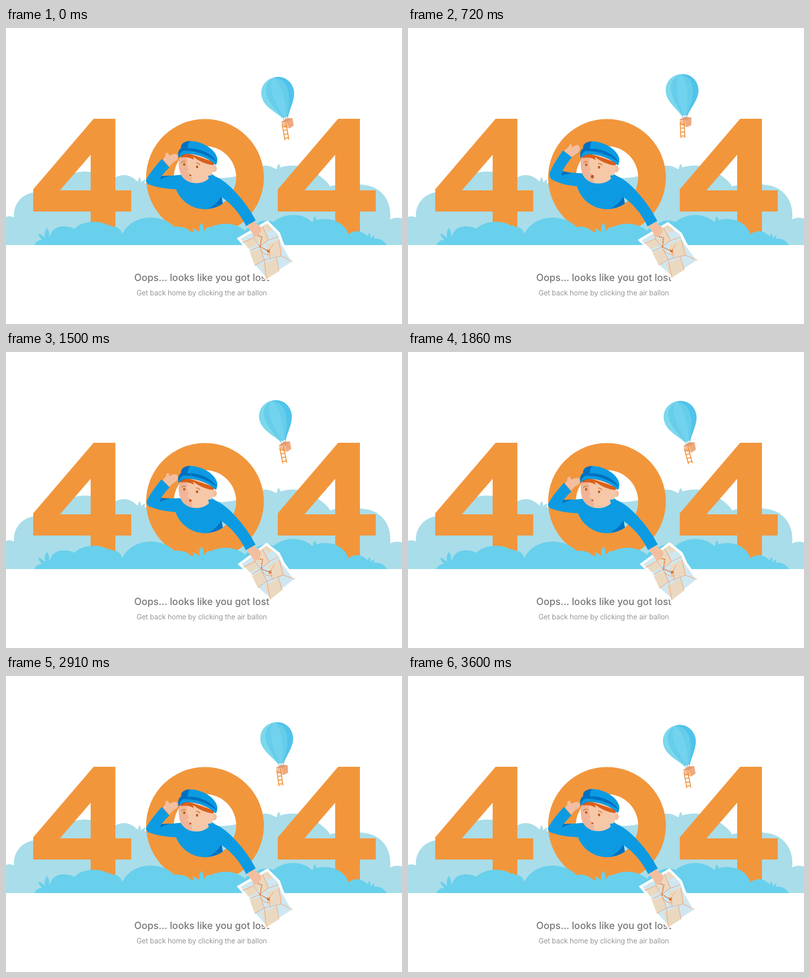
An HTML page that plays this animation: 800 px wide and 600 px high, repeating every 3630 ms.

```html
<!DOCTYPE html>
<html lang="en">
<head>
<meta charset="utf-8">
<title>404</title>
<style>
  html, body { margin: 0; height: 100%; overflow: hidden; background: #fff; }
  svg { display: block; width: 800px; height: 600px; }
  text { font-family: Inter, "Open Sans", sans-serif; text-anchor: middle; }
</style>
</head>
<body>
<svg viewBox="0 0 800 600">
  <defs>
    <path id="four" d="M177 184H221V329H253V372H221V430H171V372H55V327ZM171 257L109 329H171Z"/>
    <path id="leaves" d="M-8 12Q-17 5 -18 -2Q-9 0 -4 7Q-7 -5 0 -14Q6 -4 4 5Q8 -3 17 -6Q17 4 9 12Z"/>
    <clipPath id="envelopeClip"><use href="#envelope"/></clipPath>
    <clipPath id="mapClip"><use href="#mapShape"/></clipPath>
    <clipPath id="faceClip"><use href="#face"/></clipPath>
  </defs>

  <text x="395.5" y="512.5" font-size="19.5" font-weight="500" fill="#777">Oops... looks like you got lost</text>
  <text x="395.5" y="542" font-size="14.2" font-weight="300" fill="#777">Get back home by clicking the air ballon</text>

  <g fill="#a9dde9">
    <path d="M0 440V383Q8 380 16 384C14 350 42 328 74 333Q95 334 108 314C125 289 172 283 200 303Q208 307 218 304Q244 290 264 310L283 315
      Q360 300 440 304Q480 300 497 290Q522 270 545 286Q588 268 627 295Q648 309 655 321Q690 311 722 318C758 321 780 350 776 388Q786 382 800 386V440Z"/>
    <use href="#leaves" transform="translate(270 311) scale(.65)"/>
    <use href="#leaves" transform="translate(551 287) scale(.85)"/>
  </g>

  <g fill="#f2963c">
    <use href="#four"/>
    <use href="#four" x="494"/>
    <path fill-rule="evenodd" d="M283 303a119 118.5 0 1 1 238 0a119 118.5 0 1 1 -238 0ZM339 303a63 63.5 0 1 0 126 0a63 63.5 0 1 0 -126 0Z"/>
  </g>

  <g fill="#68d0ec">
    <path d="M57 440Q63 427 77 430L89 424Q92 403 116 402Q129 402 138 407C155 390 190 388 210 402Q231 401 235 418C251 380 311 373 340 403
      Q360 400 374 413L398 416C418 393 459 390 483 411Q489 400 500 404Q512 384 541 393C560 376 597 373 618 393C644 381 681 387 692 418
      Q710 405 727 419L738 428Q758 423 770 440Z"/>
    <use href="#leaves" transform="translate(83 419)"/>
    <use href="#leaves" transform="translate(212 407) scale(.6)"/>
    <use href="#leaves" transform="translate(395 408)"/>
    <use href="#leaves" transform="translate(624 392) scale(.75)"/>
    <use href="#leaves" transform="translate(734 424) scale(.6)"/>
  </g>

  <g id="balloon">
    <path id="envelope" fill="#66cdea" d="M0 -33C20 -33 33 -18 33 0C33 20 13 37 6 51H-6C-13 37 -33 20 -33 0C-33 -18 -20 -33 0 -33Z"/>
    <g clip-path="url(#envelopeClip)">
      <path fill="#7cd8ec" d="M0 -33C-34 -22 -24 14 -4 51H-40V-33Z"/>
      <path fill="#50c3ea" d="M0 -33C32 -22 24 14 4 51H40V-33Z"/>
      <path fill="#72d3ee" d="M0 -33C-16 -20 -12 20 -2 51H2C12 20 14 -20 0 -33Z"/>
    </g>
    <path fill="none" stroke="#3aa9d8" stroke-width=".9" d="M-5 51L-3 59M0 51V59M5 51L3 59"/>
    <path fill="#f6c09b" d="M-11 58L1 54L13 57L11 72L1 75L-9 70Z"/>
    <path fill="#e39c70" d="M-11 58L1 54L13 57L1 62Z"/>
    <path fill="#efaa80" d="M1 62L13 57L11 72L1 75Z"/>
    <path id="ladder" fill="none" stroke="#f08f36" stroke-width="1.8" d="M-4 0V33M4 -1V33M-4 5H4M-4 13H4M-4 21H4M-4 29H4"/>
  </g>

  <path fill="#0c9be2" d="M339 308Q346 298 362 296H416Q434 308 444 334L436 342L438 356A63 63.5 0 0 1 342 323Z"/>
  <path fill="#0170c0" d="M409 366Q427 357 435 341L438 356Q425 365 409 366Z"/>

  <path id="salute" fill="#f3bea0"/>
  <path id="sleeve" fill="#0c9be2"/>
  <path id="fold" fill="#0170c0"/>

  <g id="head">
    <ellipse cx="420" cy="285" rx="6" ry="7" fill="#f3bea0"/>
    <path id="face" fill="#f7c8a8" d="M352 258Q347 270 350 286C353 306 369 314 384 314.500C404 315 419 301 419 283V270L376 250Z"/>
    <path clip-path="url(#faceClip)" fill="#f0b598" d="M345 250H369Q362 273 370 287Q361 291 371 294Q378 304 375 316H345Z"/>
    <path fill="#d9601a" d="M353 263Q353 255 359 251L424 273L418 278Q396 275 378 261L379 267Q368 260 353 263Z"/>
    <ellipse cx="360" cy="276.500" rx="2.2" ry="2.700" fill="#b8601f"/>
    <ellipse cx="386" cy="281.500" rx="2.3" ry="2.800" fill="#b8601f"/>
    <path fill="none" stroke="#d06a2a" stroke-width="1.300" d="M354 273Q358 268 363 271M384 274Q389 273 392 278"/>
    <ellipse id="mouth" fill="#b8551f"/>
    <path fill="#0170c0" d="M349 264Q345 249 354 243C352 234 362 229 372 229L392 246L378 254Q358 253 349 264Z"/>
    <path fill="#0c9be2" d="M372 229C400 230 425 248 427 266Q427 273 424 278C409 263 386 255 364 255Q352 257 349 263Q351 248 367 246Q367 235 372 229Z"/>
    <path fill="#0170c0" d="M353 249Q361 243 377 244C400 247 417 257 426 272C409 258 386 250 368 249Q359 248 353 249Z"/>
  </g>

  <g id="map">
    <path id="mapShape" fill="#cfe7f0" stroke="#fff" stroke-width="5" d="M470 427L528 393L551 416L559 438L580 475L526 509L504 485L492 453Z"/>
    <g clip-path="url(#mapClip)">
      <path fill="#ead9c0" d="M500 411L519 398L531 428L520 438L506 432ZM480 432L501 425L507 440L489 447ZM517 397L528 393L542 407L530 413Z
        M489 456L514 447L520 468L502 482ZM527 438L551 429L556 446L557 462L528 465ZM517 480L546 467L552 496L526 509Z"/>
      <path fill="none" stroke="#f0a27a" stroke-width="1.100" d="M477 435L501 425L512 443L490 453M501 425L498 407M512 443L530 430L517 399M530 430L551 423
        M512 443L522 470L502 482M522 470L556 462L580 474M556 462L551 429M530 452L540 438M522 470L526 509M546 465L552 495M530 452L534 468M512 443Q519 463 535 459"/>
      <path fill="none" stroke="#fff" stroke-width="5" d="M470 427L528 393L551 416L559 438"/>
    </g>
    <path fill="none" stroke="#d9651e" stroke-width="2.200" stroke-dasharray="2.500 1.700" d="M508 420L517 424L513 443L529 452"/>
    <path stroke="#d9651e" stroke-width="1.800" d="M527.500 449.500L533 455M533 449.500L527.500 455"/>
  </g>

  <g id="arm">
    <path fill="#f3bea0" d="M485 399L501 390L506 397Q516 401 516 409Q514 417 507 422Q502 425 500 419Z"/>
    <path fill="#0c9be2" d="M408 300Q416 297 423 301Q442 309 464 333Q489 360 504.500 390L485 401.500Q468 366 436 343L415 325Z"/>
  </g>
</svg>

<script>
const LOOP = 3630, TAU = Math.PI * 2;
const $ = id => document.getElementById(id);
const set = (id, attrs) => { for (const k in attrs) $(id).setAttribute(k, attrs[k]); };
const lerp = (a, b, k) => a + (b - a) * k;
const smooth = (from, to, t) => {
  const k = Math.min(1, Math.max(0, (t - from) / (to - from)));
  return k * k * (3 - 2 * k);
};

// Blends two paths that share the same commands.
function blend([a, b], k) {
  const ends = b.match(/\d+/g);
  let i = 0;
  return a.replace(/\d+/g, n => lerp(+n, +ends[i++], k).toFixed(2));
}

const poses = {
  salute: ['M317 267L330 281Q337 271 345 268Q350 261 344 255Q334 256 330 259L327 253Q321 252 322 260Z',
           'M315 249L330 262Q338 257 346 250Q350 242 343 237Q336 238 331 242L330 235Q325 236 325 241Z'],
  sleeve: ['M315 265Q291 292 283 308Q282 314 288 317Q312 326 345 327L360 297L314 301Q320 292 330 283Z',
           'M313 248Q293 276 286 294Q285 302 290 307Q312 319 343 321L360 295L311 292Q318 278 331 262Z'],
  fold: ['M314 300L333 299Q321 302 311 307Z', 'M312 290L331 294Q320 296 310 299Z']
};

// Time, then the map's left, right and bottom corners.
const mapKeys = [
  [0, 470, 427, 580, 475, 526, 509],
  [720, 468, 430, 586, 472, 533, 506],
  [1170, 472, 430, 584, 461, 535, 500],
  [1860, 472, 430, 585, 462, 533, 503],
  [2520, 470, 428, 584, 475, 532, 512],
  [2910, 470, 427, 580, 475, 526, 509],
  [LOOP, 470, 427, 580, 475, 526, 509]
];
const basis = ([, lx, ly, rx, ry, bx, by]) => new DOMMatrix([rx - bx, ry - by, bx - lx, by - ly, lx, ly]);
const mapRest = basis(mapKeys[0]).inverse();

function drawMap(t) {
  const i = mapKeys.findIndex(key => key[0] > t);
  const from = mapKeys[i - 1], to = mapKeys[i];
  const k = smooth(from[0], to[0], t);
  const m = basis(from.map((v, j) => lerp(v, to[j], k))).multiply(mapRest);
  set('map', { transform: `matrix(${[m.a, m.b, m.c, m.d, m.e, m.f]})` });
}

function drawBalloon(t) {
  const a = TAU * t / (LOOP / 2), c = Math.cos(a), s = Math.sin(a);
  const x = 549.8 - 0.8 * c + 5.6 * s;
  const y = 129.2 + 3.2 * Math.cos(a + 0.07);
  const tilt = -12 - 5.5 * c + 2.9 * s;
  const hang = -9 - 3.5 * c + 3.6 * Math.cos(TAU * (t - 500) / LOOP);
  set('balloon', { transform: `translate(${x} ${y}) rotate(${tilt})` });
  set('ladder', { transform: `translate(-6.5 63) rotate(${hang - tilt})` });
}

function draw(t) {
  const raise = smooth(350, 680, t) - smooth(1250, 1700, t);
  for (const id in poses) set(id, { d: blend(poses[id], raise) });
  set('mouth', { cx: 372.5, cy: 298.5 + raise * 2, rx: 2.2 + raise * 0.9, ry: 1.6 + raise * 1.8 });
  set('head', { transform: `translate(0 ${1 - Math.cos(TAU * t / LOOP)})` });
  set('arm', { transform: `rotate(${raise * 0.9} 440 330)` });
  drawMap(t);
  drawBalloon(t);
}

const start = performance.now();
(function tick() {
  draw((performance.now() - start) % LOOP);
  requestAnimationFrame(tick);
})();
</script>
</body>
</html>
```
